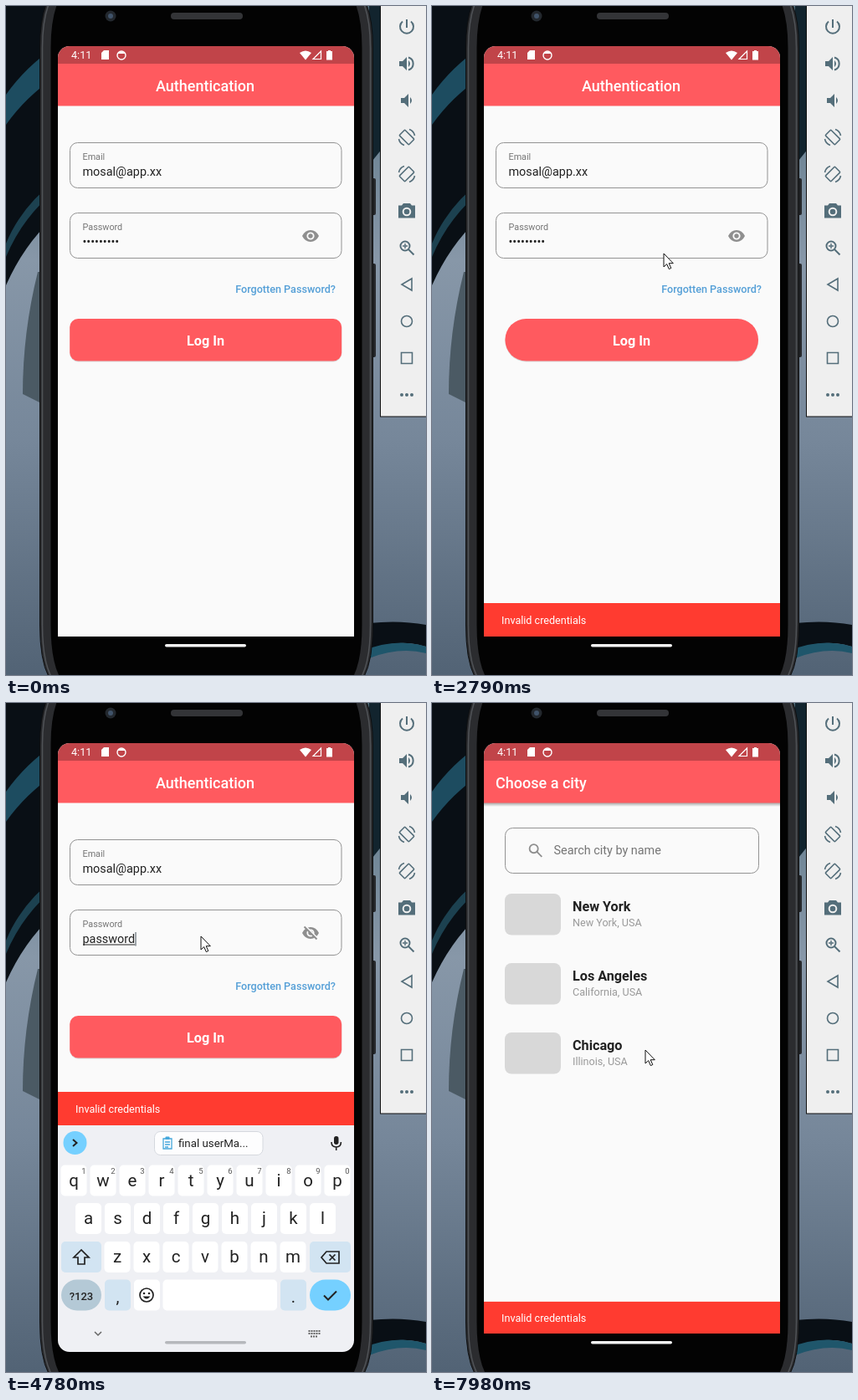
Recreate the animation shown at these times as an HTML page. Size 502 by 800 pixels, loop 8 s.

```html
<!DOCTYPE html>
<html lang="en">
<head>
<meta charset="utf-8">
<title>Login flow</title>
<style>
html, body { margin: 0; width: 100%; height: 100%; overflow: hidden; background: #66788a; }
svg { display: block; width: 502px; height: 800px; font-family: Roboto, sans-serif; }
text { white-space: pre; }
.line { fill: none; stroke: currentColor; stroke-width: 2; }
.fill { fill: currentColor; }
.title { font-size: 18px; font-weight: 500; fill: #fff; }
.label { font-size: 10.8px; fill: #757575; }
.body { font-size: 14.4px; fill: #222; }
.small { font-size: 12.6px; }
.mid { text-anchor: middle; }
.box { fill: none; stroke: #939393; }
</style>
</head>
<body>
<svg id="stage" viewBox="0 0 502 800" xmlns="http://www.w3.org/2000/svg"></svg>
<script>
const LOOP = 8000;
const text = (x, y, s, cls, extra = '') => `<text x="${x}" y="${y}" class="${cls}" ${extra}>${s}</text>`;
const rect = (x, y, w, h, rx, fill, extra = '') =>
  `<rect x="${x}" y="${y}" width="${w}" height="${h}" rx="${rx}" fill="${fill}" ${extra}/>`;
const line = (d, extra = '') => `<path class="line" d="${d}" ${extra}/>`;
const fill = (d, extra = '') => `<path class="fill" d="${d}" ${extra}/>`;
const at = (x, y, s, k = 1) => `<g transform="translate(${x} ${y}) scale(${k})">${s}</g>`;

const wallpaper = `
  <rect width="502" height="800" fill="url(#wall)"/>
  <path d="M0 0H60V250Q22 284 0 334Z" fill="#090f15"/>
  <path d="M0 106Q24 72 60 48V84Q24 108 0 142Z" fill="#1d4c60"/>
  <path d="M0 284Q18 240 60 208V220Q20 252 0 300Z" fill="#1c4150"/>
  <path d="M38 318Q20 390 20 464L44 476V318Z" fill="#4b5a64"/>
  <path d="M434 0H450V170L434 190Z" fill="#12242e"/>
  <path d="M434 738Q470 734 502 740V766Q470 756 434 770Z" fill="#090f15"/>
  <path d="M434 768Q470 756 502 766V774Q470 766 434 780Z" fill="#1f566b"/>`;

const phone = `
  ${rect(436, 206, 6, 44, 2, '#26282b')}${rect(436, 308, 6, 112, 2, '#26282b')}
  <path d="M48 -2Q40.500 18 40.500 50V740Q40.500 782 51 802H428Q438.500 782 438.500 740V50Q438.500 18 431 -2Z" fill="#2b2c2f" stroke="#0d0e0f"/>
  <path d="M51 -2Q43.500 18 43.500 50V740Q43.500 782 54 802H425Q435.500 782 435.500 740V50Q435.500 18 428 -2Z" fill="none" stroke="#505357" stroke-width="1.500"/>
  <path d="M61 -2Q53.500 18 53.500 50V740Q53.500 782 64 802H415Q425.500 782 425.500 740V50Q425.500 18 418 -2Z" fill="#030303"/>
  ${rect(197, 8, 86, 8, 4, '#333437')}
  <circle cx="125" cy="12" r="6.5" fill="#23282e"/><circle cx="125" cy="12" r="3" fill="#40536a"/>`;

const speaker = fill('M-9-3h4l5-5v16l-5-5h-4zM2-4q4 4 0 8z');
const turn = rect(-8, -4.7, 16, 9.4, 1, 'none', 'class="line" transform="rotate(45)" style="stroke-width:1.6"') +
  line('M3-9.500Q8.500-7.500 9.500-2M-3 9.500Q-8.500 7.500-9.500 2', 'style="stroke-width:1.6"');
const lens = '<circle class="line" cx="-2" cy="-2" r="5.500"/>' + line('M2 2l6.500 6.500', 'stroke-width="2.5"');
const tools = [
  line('M0-9V1M-5-6.500a8 8 0 1 0 10 0'),
  speaker + line('M2-7.500A7.800 7.800 0 0 1 2 7.500'),
  at(2, 0, speaker),
  turn,
  `<g transform="scale(-1 1)">${turn}</g>`,
  fill('M-4-9h8l2 2.500h4V8.500H-10V-6.500h4z') + '<circle cy="1" r="4.300" fill="none" stroke="#efefef" stroke-width="2"/>',
  lens + line('M-5-2h6M-2-5v6', 'style="stroke-width:1.4"'),
  line('M6-7V7L-6 0z', 'style="stroke-width:1.6"'),
  '<circle class="line" r="6.500" style="stroke-width:1.6"/>',
  line('M-6.500-6.500h13v13h-13z', 'style="stroke-width:1.6"'),
  [-6, 0, 6].map(x => `<circle class="fill" cx="${x}" r="2"/>`).join('')
];
const toolbar = rect(447.5, -1, 60, 492, 0, '#efefef', 'stroke="#111"') +
  `<g color="#546e7a">${tools.map((s, i) => at(479, 25 + 44 * i, s)).join('')}</g>`;

const status = `
  ${rect(62, 48, 354, 21, 0, '#c14449')}
  ${text(78, 63, '4:11', 'small', 'fill="#fff"')}
  <path d="M117 53h6v11h-9V56z" fill="#fff"/>
  <circle cx="138" cy="59" r="5" fill="none" stroke="#fff" stroke-width="1.4"/>
  <path d="M133.500 57a5 5 0 0 1 9 0z" fill="#fff"/>
  <path d="M351 56q7-5 14 0l-7 8.500z" fill="#fff"/>
  <path d="M376.500 54v9.500H367z" fill="none" stroke="#fff" stroke-width="1.2"/>
  <path d="M383 54h2v-1h3v1h2v10.500h-7z" fill="#fff"/>`;

const appBar = rect(62, 69, 354, 50.5, 0, '#ff5a5f');
const eye = fill('M-10 0Q-6.500-7 0-7T10 0Q6.500 7 0 7T-10 0z') +
  '<circle r="3.700" fill="none" stroke="#fafafa" stroke-width="1.800"/>';
const loginPage = `
  ${appBar}
  ${text(238, 101.5, 'Authentication', 'title mid')}
  ${rect(76.5, 163.5, 324.500, 54, 9, 'none', 'class="box"')}
  ${text(91.5, 184, 'Email', 'label')}${text(91.5, 203, 'mosal@app.xx', 'body')}
  ${rect(76.5, 247.5, 324.500, 54, 9, 'none', 'class="box"')}
  ${text(91.5, 268, 'Password', 'label')}${text(91.5, 287, '', 'body', 'id="pass"')}
  <rect id="under" x="92" y="288.500" height="1" fill="#222"/>
  <rect id="caret" y="274" width="1.700" height="16.500"/>
  <circle id="eyeInk" cx="364" cy="275" fill="#000" fill-opacity=".08"/>
  <g color="#8f8f8f">${at(364, 275, eye)}
    <g id="slash">${line('M357.500 266.500L373 282', 'style="stroke:#fafafa"')}${line('M356.500 267.500L371.500 282.500')}</g></g>
  ${text(394, 342.5, 'Forgotten Password?', 'small', 'fill="#549fd7" font-weight="500" text-anchor="end"')}
  <rect id="shade" y="375" height="50.500" fill="#000" opacity=".14"/>
  <rect id="button" y="374" height="50.500" fill="#ff5a5f"/>
  <circle id="ink" cy="400" fill="#fff" clip-path="url(#inkClip)"/>
  ${text(238.5, 406, 'Log In', 'mid', 'id="login" font-size="16.2" font-weight="700" fill="#fff"')}
  <path id="spin" fill="none" stroke="#fff" stroke-width="3.400"/>`;

const cities = [['New York', 'New York'], ['Los Angeles', 'California'], ['Chicago', 'Illinois']];
const cityPage = `
  ${rect(62, 69, 354, 685, 0, '#fafafa')}
  ${rect(62, 119, 354, 5, 0, 'url(#drop)')}${appBar}
  ${text(76, 101.5, 'Choose a city', 'title')}
  ${rect(87.5, 149.5, 303, 54, 9, 'none', 'class="box"')}
  <g color="#8f8f8f">${at(123.5, 176, lens, .92)}</g>
  ${text(145.5, 181, 'Search city by name', 'body', 'style="fill:#757575"')}
  ${cities.map(([name, state], i) => at(0, 83 * i,
    rect(87, 228, 67, 49.5, 8, '#d8d8d8') +
    text(168, 249, name, '', 'font-size="16.2" font-weight="700" fill="#222"') +
    text(168, 267, state + ', USA', 'small', 'fill="#9a9a9a"'))).join('')}`;

const key = (x, y, c, hint) => rect(x - 15.5, y, 31, 37, 5, '#fff') +
  text(x, y + 25, c, 'mid', 'font-size="20.5"') +
  (hint === undefined ? '' : text(x + 12, y + 10, hint, 'mid', 'font-size="9.500" fill="#555"'));
const row = (s, x, y, hint) => [...s].map((c, i) => key(x + 35 * i, y, c, hint && hint[i])).join('');
const keyboard = `
  ${rect(62, 505, 354, 290, 0, '#eff0f4')}
  <circle cx="82.500" cy="526" r="14" fill="#75d0ff"/>${line('M80 522l4.500 4-4.500 4')}
  <g id="chip">${rect(177.5, 512.5, 129.500, 28, 7, '#fdfdfe', 'stroke="#d5d8de"')}
    <g color="#45a8dc">${line('M188 521h10v12h-10zM190 525h6M190 528h6M190 531h4', 'style="stroke-width:1.3"')}
    ${rect(190.500, 518.500, 5, 3.500, 1, '#45a8dc')}</g>
    ${text(206, 531, 'final userMa...', '', 'font-size="13.3"')}</g>
  ${rect(392, 518, 5.500, 10, 2.700, '#222')}${line('M389 525q0 6 5.700 6t5.700-6M394.700 531v4', 'style="stroke-width:1.6"')}
  ${row('qwertyuiop', 81, 552.5, '1234567890')}
  ${row('asdfghjkl', 98.5, 598)}
  ${rect(66, 644, 48, 37, 5, '#d2e4f2')}${line('M90 654l-9 9h5v8h8v-8h5z', 'style="stroke-width:1.7"')}
  ${row('zxcvbnm', 133, 644)}
  ${rect(363, 644, 49, 37, 5, '#d2e4f2')}
  ${line('M383 656h15v14h-15l-6-7zM386.500 659.500l7 7M393.500 659.500l-7 7', 'style="stroke-width:1.7"')}
  ${rect(66, 689.5, 48, 37, 18.5, '#b4c9d6')}${text(90, 713.500, '?123', 'mid', 'font-size="13" font-weight="500"')}
  ${rect(118, 689.5, 31, 37, 5, '#d2e4f2')}${text(133.500, 717, ',', 'mid', 'font-size="20"')}
  ${rect(153, 689.5, 31, 37, 5, '#fff')}
  <circle class="line" cx="168" cy="708" r="8" style="stroke-width:1.700"/>
  <circle cx="165" cy="706" r="1.300"/><circle cx="171" cy="706" r="1.300"/>${fill('M163.500 709.500h9q-4.500 6-9 0z')}
  ${rect(187.5, 689.5, 136.500, 37, 5, '#fff')}
  ${rect(328, 689.5, 31, 37, 5, '#d2e4f2')}${text(343.500, 717, '.', 'mid', 'font-size="20"')}
  ${rect(363, 689.5, 49, 37, 18.5, '#75d0ff')}${line('M380 708.500l5 5 10-10')}
  <g color="#666">${line('M106 752l4 4 4-4', 'style="stroke-width:1.500"')}
  ${line('M361.500 751h14M361.500 754h14M364 757.500h9', 'style="stroke-width:2" stroke-dasharray="2 1"')}</g>`;

const stage = document.getElementById('stage');
stage.innerHTML = `
  <defs>
    <linearGradient id="wall" x2="0" y2="1"><stop stop-color="#53707f"/><stop offset=".38" stop-color="#8797a8"/>
      <stop offset=".65" stop-color="#76879a"/><stop offset="1" stop-color="#526375"/></linearGradient>
    <linearGradient id="drop" x2="0" y2="1"><stop stop-opacity=".35"/><stop offset="1" stop-opacity="0"/></linearGradient>
    <clipPath id="screen">${rect(62, 48, 354, 728, 14, '#000')}</clipPath>
    <clipPath id="appClip">${rect(62, 48, 354, 706, 0, '#000')}</clipPath>
    <clipPath id="inkClip"><rect id="inkRect" y="374" height="50.500"/></clipPath>
  </defs>
  ${wallpaper}${phone}${toolbar}
  <g clip-path="url(#screen)">
    <g clip-path="url(#appClip)">
      ${rect(62, 48, 354, 706, 0, '#fafafa')}
      ${loginPage}<g id="cities">${cityPage}</g>${status}
      <g id="snack">${rect(62, 0, 354, 40, 0, '#ff3b30')}${text(83, 24.500, 'Invalid credentials', 'small', 'fill="#fff"')}</g>
    </g>
    <g id="keys" color="#222" fill="#222">${keyboard}</g>
    <rect id="handle" x="190" y="763" width="97" height="3.600" rx="1.800"/>
  </g>
  <path id="mouse" d="M0 0V16L3.700 12.600 6.300 18.600 8.800 17.500 6.200 11.700H11.300Z" fill="#fff" stroke="#111"/>`;

const el = {};
stage.querySelectorAll('[id]').forEach(n => el[n.id] = n);
const set = (n, attrs) => { for (const k in attrs) el[n].setAttribute(k, attrs[k]); };
const show = (n, on) => set(n, { visibility: on ? 'visible' : 'hidden' });

const prog = (t, start, len) => Math.min(1, Math.max(0, (t - start) / len));
const mix = (a, b, p) => a + (b - a) * p;
const easeOut = p => 1 - (1 - p) ** 3;
const smooth = p => p * p * (3 - 2 * p);
const circ = p => p < .5 ? (1 - Math.sqrt(1 - 4 * p * p)) / 2 : (1 + Math.sqrt(1 - (2 - 2 * p) ** 2)) / 2;
// Material standard curve: cubic-bezier(.4, 0, .2, 1)
const standard = x => {
  let lo = 0, hi = 1, u = .5;
  for (let i = 0; i < 18; i++) {
    u = (lo + hi) / 2;
    if (1.2 * u * (1 - u) ** 2 + .6 * u * u * (1 - u) + u ** 3 < x) lo = u; else hi = u;
  }
  return u * u * (3 - 2 * u);
};

const TAP1 = 1117, FAIL = 2427, REVEAL = 3220, OPEN = 3770, ERASE = 4300, TAP2 = 5811, CLOSE = 5843, NEXT = 7400;
const path = [
  [240, 452, 764], [420, 168, 280], [570, 168, 280], [950, 270, 390], [2130, 270, 390], [2190, 272, 362],
  [2790, 277, 296], [3010, 284, 288], [3170, 363, 276], [3300, 363, 276], [3600, 233, 279],
  [5040, 233, 279], [5500, 254, 412], [6660, 254, 412], [6800, 255, 415]
];

function drawMouse(t) {
  show('mouse', t >= 240);
  const next = path.findIndex(p => p[0] > t);
  const i = next < 0 ? path.length - 1 : Math.max(1, next);
  const a = path[i - 1], b = path[i];
  const p = smooth(prog(t, a[0], b[0] - a[0]));
  set('mouse', { transform: `translate(${mix(a[1], b[1], p)} ${mix(a[2], b[2], p)})` });
}

function drawSpinner(ms) {
  const p = ms / 1333 % 1;
  const head = standard(Math.min(1, p * 2)), tail = standard(Math.max(0, p * 2 - 1));
  const from = -Math.PI / 2 + tail * 1.5 * Math.PI + ms / 2222 * 2 * Math.PI + ms / 1333 * Math.PI / 2;
  const sweep = Math.max(.01, (head - tail) * 1.5 * Math.PI);
  const point = a => `${238.500 + 11 * Math.cos(a)} ${399.700 + 9.700 * Math.sin(a)}`;
  set('spin', { d: `M${point(from)}A11 9.700 0 ${sweep > Math.PI ? 1 : 0} 1 ${point(from + sweep)}` });
}

function drawButton(t) {
  const tap = t < TAP2 - 200 ? TAP1 : TAP2;
  const back = tap === TAP1 && t >= FAIL;
  const squeeze = circ(back ? 1 - prog(t, FAIL, 500) : prog(t, tap, 500));
  const r = back ? mix(25, 10, prog(t, 2830, 180)) : mix(10, 25, prog(t, tap + 260, 220));
  const width = mix(325, 46, squeeze), x = 238.700 - width / 2;
  const shape = { x, width, rx: Math.min(r, width / 2) };
  set('button', shape);
  set('shade', shape);
  set('inkRect', { x, width, rx: mix(10, 25, prog(t, tap, 200)) });
  set('ink', {
    cx: tap === TAP1 ? 270 : 254,
    r: mix(10, 260, prog(t, tap - 60, 260)),
    opacity: .25 * prog(t, tap - 60, 80) * (1 - prog(t, tap + 300, 200))
  });
  const busy = back ? 1 - prog(t, FAIL, 200) : prog(t, tap, 200);
  set('login', { opacity: 1 - busy });
  set('spin', { opacity: busy });
  drawSpinner(Math.max(0, Math.min(t, 7260) - tap - 50));
}

function drawPassword(t) {
  const shown = t >= REVEAL, focus = t >= 3640 && t < CLOSE;
  const value = t < ERASE ? 'passwordd' : 'password';
  const s = shown ? value : '•'.repeat(9);
  if (el.pass.textContent !== s) el.pass.textContent = s;
  show('slash', shown);
  show('under', focus);
  show('caret', focus);
  if (focus) {
    const w = el.pass.getComputedTextLength();
    set('under', { width: w });
    set('caret', { x: 91.5 + w, fill: t >= 4400 && t < 5040 ? '#8d959b' : '#2f8fd3' });
  }
  set('eyeInk', { r: mix(4, 13, prog(t, REVEAL - 60, 160)), opacity: t < REVEAL - 60 ? 0 : 1 - prog(t, REVEAL + 80, 220) });
}

function drawPanels(t) {
  const closing = t >= CLOSE;
  const top = closing ? mix(505, 776, easeOut(prog(t, CLOSE, 400))) : mix(776, 505, easeOut(prog(t, OPEN, 400)));
  set('keys', { transform: `translate(0 ${top - 505})` });
  show('keys', top < 776);
  show('chip', !closing);
  const enter = 40 * (1 - standard(prog(t, FAIL, 250)));
  const leave = 40 * smooth(prog(t, 7900, 620));
  set('snack', { transform: `translate(0 ${Math.min(754, top - (closing ? 8 : 0)) - 40 + enter + leave})` });
  show('snack', t >= FAIL);
  const onKeys = t >= OPEN + 50 && t < 6660;
  set('handle', {
    fill: !onKeys ? '#f2f2f2' : closing ? '#858585' : '#b6b8bc',
    opacity: onKeys ? prog(t, 4050, 350) : 1
  });
  set('cities', { opacity: prog(t, NEXT, 340) });
  show('cities', t >= NEXT);
}

const start = performance.now();
function frame() {
  const t = (performance.now() - start) % LOOP;
  drawMouse(t);
  drawButton(t);
  drawPassword(t);
  drawPanels(t);
  requestAnimationFrame(frame);
}
frame();
</script>
</body>
</html>
```
